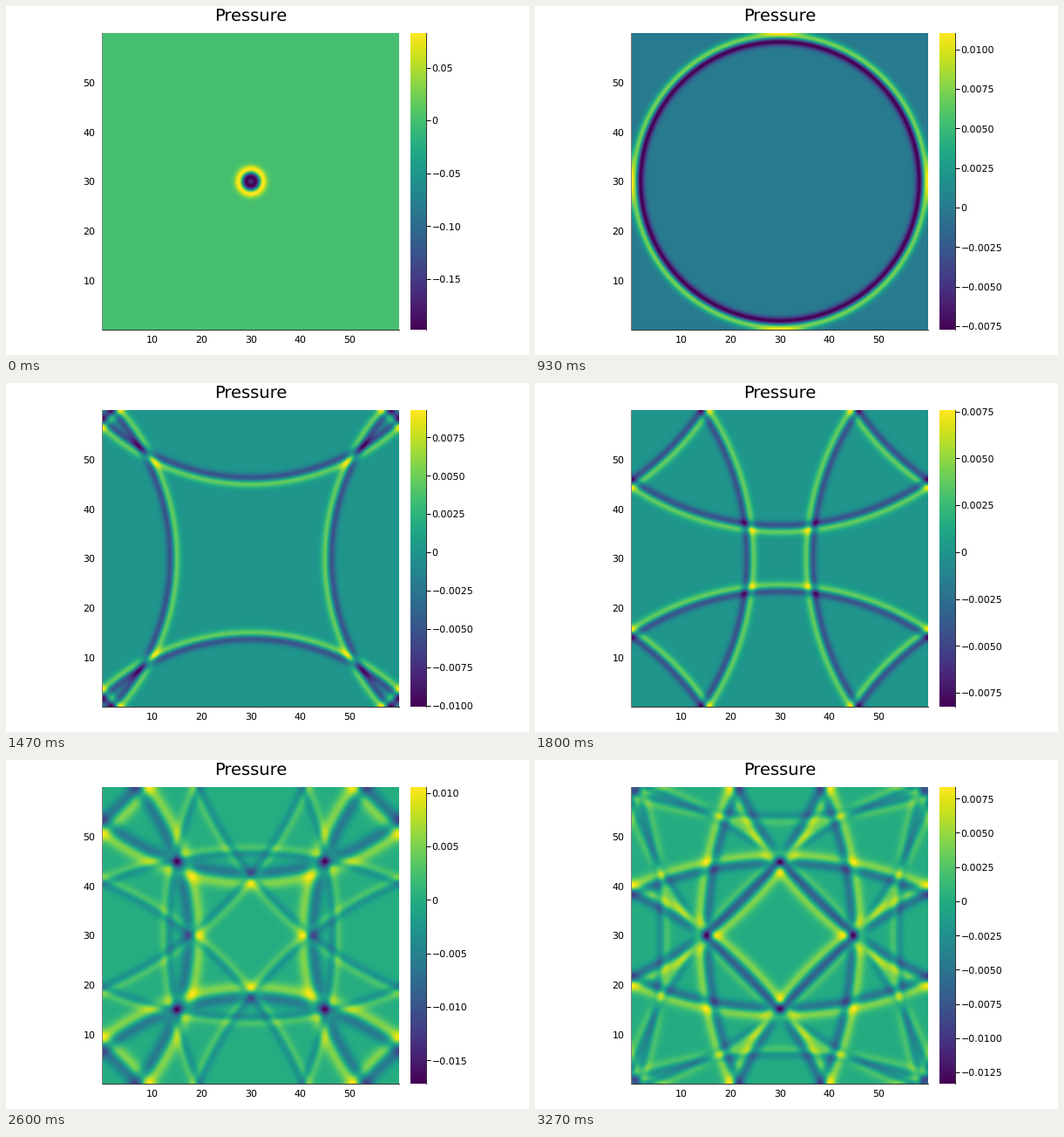
Animation of 600x400 px, one loop 3340 ms. Source, as a matplotlib script:

```python
import math

import matplotlib.pyplot as plt
import numpy as np
from matplotlib.animation import FuncAnimation

# A Gaussian pressure pulse in a closed cube with rigid walls, seen on its
# middle plane and summed from the standing waves of the cube.
WIDTH, HEIGHT, DPI = 600, 400, 100
SIDE = 60
PIXELS = 340
MODES = 64
STEPS = 50
TRAVEL = 1.929       # distance the front covers per step
DISPERSION = 1e-4    # short waves lag slightly
TICK_MS = 20
LOOP_MS = 3340

wave = 2 * np.pi * np.arange(MODES) / SIDE
weight = np.sqrt(np.pi) / SIDE * np.exp(-wave**2 / 4)
weight[1:] *= 2
amplitude = np.einsum("i,j,k->ijk", weight, weight, weight)
square = wave**2
k_total = np.sqrt(square[:, None, None] + square[:, None] + square)
omega = k_total * (1 - DISPERSION * k_total**2)
position = (np.arange(PIXELS) + 0.5) / PIXELS * SIDE - SIDE / 2
basis = np.cos(np.outer(position, wave))


def pressure(step):
    distance = TRAVEL * (step + 1)
    plane = (amplitude * np.cos(omega * distance)).sum(axis=2)
    return basis @ plane @ basis.T


fields = [pressure(step) for step in range(STEPS)]


def points(pixels):
    return pixels * 72 / DPI


def add_axes(left, top, width, height):
    axes = fig.add_axes([left / WIDTH, 1 - (top + height) / HEIGHT,
                         width / WIDTH, height / HEIGHT])
    for spine in axes.spines.values():
        spine.set_visible(False)
    return axes


def show_spine(axes, side, color, outward=0):
    spine = axes.spines[side]
    spine.set_visible(True)
    spine.set_position(("outward", points(outward)))
    spine.set_linewidth(points(1))
    spine.set_color(color)


def bar_ticks(low, high):
    span = high - low
    power = 10.0 ** math.floor(math.log10(span))
    lead = span / power
    step = power * (1 if lead > 5 else 0.5 if lead > 2.5 else 0.25)
    digits = len(f"{step:g}".partition(".")[2])
    counts = range(math.ceil(low / step), math.floor(high / step) + 1)
    labels = [f"{n * step:.{digits}f}".replace("-", "\u2212") if n else "0"
              for n in counts]
    return [n * step for n in counts], labels


plt.rcParams.update({"font.family": "DejaVu Sans", "text.hinting": "no_hinting"})
fig = plt.figure(figsize=(WIDTH / DPI, HEIGHT / DPI), dpi=DPI, facecolor="white")
fig.text(281 / WIDTH, 1 - 18 / HEIGHT, "Pressure", fontsize=14,
         ha="center", va="baseline")

ax = add_axes(111, 31, PIXELS, PIXELS)
heat = ax.imshow(fields[0], cmap="viridis", origin="lower", aspect="auto",
                 interpolation="nearest", extent=(0, SIDE, 0, SIDE))
ax.set_xticks(range(10, SIDE, 10))
ax.set_yticks(range(10, SIDE, 10))
ax.tick_params(length=0, labelsize=points(11))
ax.tick_params(axis="x", pad=points(6.5))
ax.tick_params(axis="y", pad=points(7.5))
show_spine(ax, "left", "0.5", outward=1)
show_spine(ax, "bottom", "0.2")

bar = add_axes(464, 31, 18, PIXELS)
ramp = bar.imshow(np.linspace(0, 1, 256)[:, None], cmap="viridis",
                  origin="lower", aspect="auto", interpolation="nearest")
bar.set_xticks([])
bar.yaxis.tick_right()
bar.tick_params(axis="y", length=points(5), width=points(1),
                labelsize=points(11), pad=points(1.7))
show_spine(bar, "right", "0.2")


def update(tick):
    step = min(int((tick * TICK_MS + 15) * 0.015), STEPS - 1)
    field = fields[step]
    low, high = field.min(), field.max()
    heat.set_data(field)
    heat.set_clim(low, high)
    ramp.set_extent((0, 1, low, high))
    bar.set_xlim(0, 1)
    bar.set_ylim(low, high)
    bar.set_yticks(*bar_ticks(low, high))
    return heat, ramp


animation = FuncAnimation(fig, update, frames=LOOP_MS // TICK_MS,
                          interval=TICK_MS, repeat=True, repeat_delay=0)
plt.show()
```
